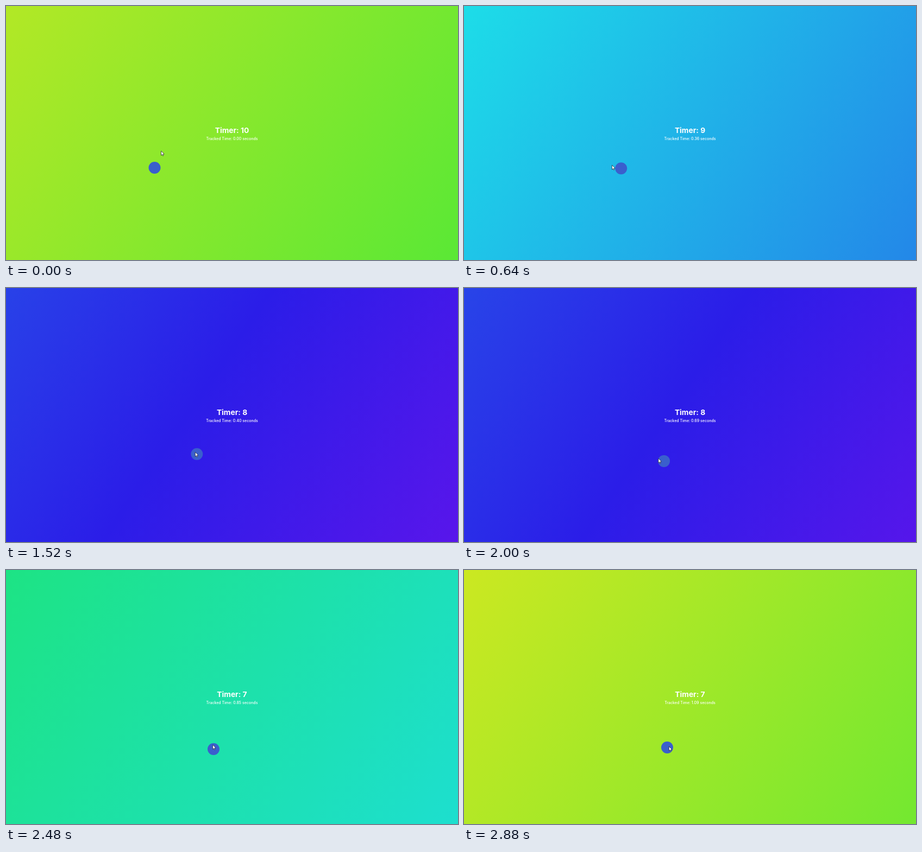
Recreate the animation shown at these times as an HTML page with a canvas. Size 832 by 468 pixels, loop 2960 ms.

```html
<!DOCTYPE html>
<html lang="en">
<head>
<meta charset="utf-8">
<title>Timer</title>
<style>
  html, body { margin: 0; width: 100%; height: 100%; overflow: hidden; }
  canvas { display: block; width: 832px; height: 468px; }
</style>
</head>
<body>
<canvas id="stage" width="832" height="468"></canvas>
<script>
const ctx = document.getElementById('stage').getContext('2d');
const W = 832, H = 468, LOOP = 2960, STEP = 80;

// Oversized rainbow that pans back and forth behind the stage
const RAINBOW = ['#ff2400', '#e81d1d', '#e8b71d', '#e3e81d', '#1de840',
                 '#1ddde8', '#2b1de8', '#dd00f3', '#dd00f3'];
const SCALE = 18, ANGLE = 124 * Math.PI / 180;
const HALF = 2500, PEAK = 1918;

// Every second the timer ticks and the ball heads for its next target
const FIRST_TICK = 430, SECOND = 1000;
const TARGETS = [[273.5, 298], [348.2, 303.6], [383, 330.4], [363, 322.9]];

// Pointer stops: [time, x, y]
const POINTER = [[0, 285.6, 267], [200, 271.8, 293], [760, 272.6, 293], [1040, 338.7, 290.6],
                 [2000, 357.9, 314], [2480, 380.6, 322], [2880, 377.3, 325]];

// Spans in which the pointer is tracked on the ball
const HOVERS = [[200, 560], [960, 1000], [1710, 2000], [2320, 2480], [2640, 2880]];

const mix = (a, b, k) => a + (b - a) * k;
const mixPoint = (a, b, k) => [mix(a[0], b[0], k), mix(a[1], b[1], k)];

// cubic-bezier(.25, .1, .25, 1)
function ease(x) {
  const curve = (p, q, s) => 3 * p * s * (1 - s) ** 2 + 3 * q * s * s * (1 - s) + s ** 3;
  let lo = 0, hi = 1;
  for (let i = 0; i < 24; i++) {
    const mid = (lo + hi) / 2;
    if (curve(.25, .25, mid) < x) lo = mid; else hi = mid;
  }
  return curve(.1, 1, lo);
}

function ballAt(t) {
  const leg = Math.max(0, (t - FIRST_TICK) / SECOND);
  const i = Math.floor(leg);
  return mixPoint(TARGETS[i], TARGETS[i + 1], leg - i);
}

function pointerAt(t) {
  const i = Math.max(1, POINTER.findIndex(stop => stop[0] >= t));
  const [t0, ...from] = POINTER[i - 1], [t1, ...to] = POINTER[i];
  return mixPoint(from, to, (t - t0) / (t1 - t0));
}

function trackedSeconds(t) {
  const ms = HOVERS.reduce((sum, [from, to]) => sum + Math.max(0, Math.min(t, to) - from), 0);
  return (ms / 1000).toFixed(2);
}

function drawBackground(t) {
  const phase = (t - PEAK) / HALF;
  const k = ease(1 - Math.abs(phase));
  const pan = phase < 0 ? k : 1 - ease(phase);
  const w = W * SCALE, h = H * SCALE;
  const cx = w / 2 - (w - W) * pan;
  const cy = h / 2 - (h - H) * mix(.82, .19, pan);
  const dx = Math.sin(ANGLE), dy = -Math.cos(ANGLE);
  const r = (w * dx + h * dy) / 2;
  const fill = ctx.createLinearGradient(cx - dx * r, cy - dy * r, cx + dx * r, cy + dy * r);
  RAINBOW.forEach((color, i) => fill.addColorStop(i / (RAINBOW.length - 1), color));
  ctx.fillStyle = fill;
  ctx.fillRect(0, 0, W, H);
}

function drawText(text, y, font) {
  ctx.font = font + ' Inter, sans-serif';
  ctx.textAlign = 'center';
  ctx.fillStyle = '#fff';
  ctx.fillText(text, W / 2, y);
}

function drawBall([x, y]) {
  ctx.fillStyle = '#3a5fcd';
  ctx.beginPath();
  ctx.arc(x, y, 11, 0, Math.PI * 2);
  ctx.fill();
}

function drawPointer([x, y]) {
  const arrow = [[0, 0], [0, 8.2], [1.8, 6.6], [3, 9.2], [4.2, 8.7], [3.1, 6.1], [5.6, 5.9]];
  ctx.beginPath();
  arrow.forEach(([px, py]) => ctx.lineTo(x + px, y + py));
  ctx.closePath();
  ctx.fillStyle = '#fff';
  ctx.fill();
  ctx.strokeStyle = '#1c1c28';
  ctx.lineWidth = .7;
  ctx.stroke();
}

function draw(t) {
  const count = 10 - Math.max(0, Math.ceil((t - FIRST_TICK) / SECOND));
  drawBackground(t);
  drawText('Timer: ' + count, 233.8, '700 13.8px');
  drawText(`Tracked Time: ${trackedSeconds(t)} seconds`, 247, '500 7px');
  drawBall(ballAt(t));
  drawPointer(pointerAt(t));
}

const start = performance.now();
function tick() {
  const t = (performance.now() - start) % LOOP;
  draw(Math.floor(t / STEP) * STEP);
  requestAnimationFrame(tick);
}
tick();
</script>
</body>
</html>
```
